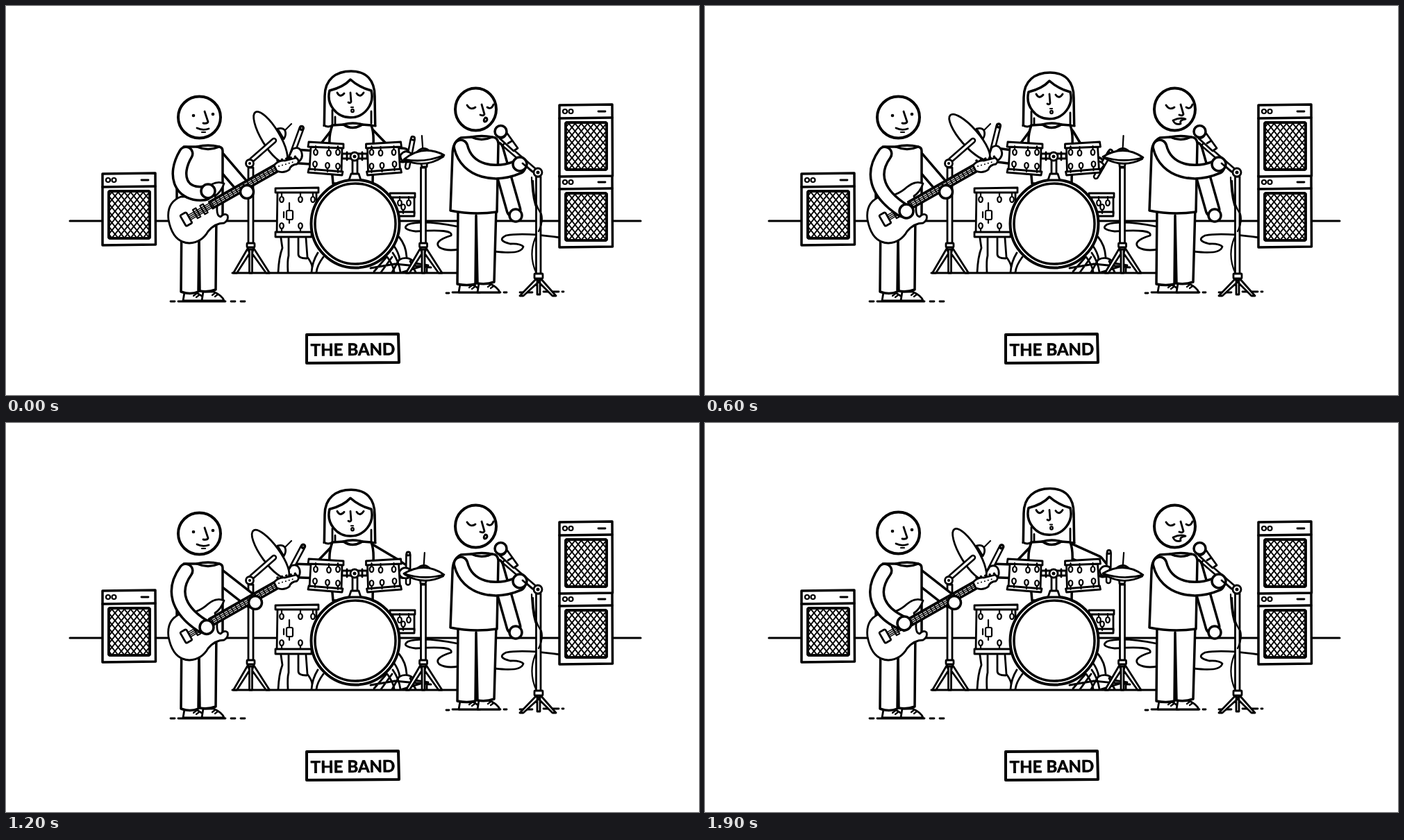
Animation, 998 px wide and 561 px high, one loop 2000 ms. Source, as an HTML page without scripts:

```html
<!DOCTYPE html>
<html lang="en">
<head>
<meta charset="utf-8">
<title>The band</title>
<style>
html, body { margin: 0; width: 100%; height: 100%; overflow: hidden; background: #fff; }
svg { display: block; width: 100vw; height: 100vh; fill: #fff; stroke: #000; stroke-width: 3.5; stroke-linecap: round; stroke-linejoin: round; }
.line { fill: none; }
.mid { stroke-width: 2.8; }
.thin { stroke-width: 2.2; }
.dot { fill: #000; stroke: none; }
/* tubes: a black stroke with a narrower white one on top */
.tube { fill: none; stroke-width: 23; }
.core { fill: none; stroke: #fff; stroke-width: 16; }
.rod { fill: none; stroke-width: 8.5; }
.rod-core { fill: none; stroke: #fff; stroke-width: 3.4; }
text { font: 700 24px Lato, "Open Sans", sans-serif; fill: #000; stroke: #000; stroke-width: .7; text-anchor: middle; }

/* poses advance ten times a second */
.move { animation: 2s steps(3) infinite; }
.hold { animation: 2s step-end infinite; }

.nod { animation-name: nod; }
@keyframes nod {
  15% { translate: 0 -1px; }
  30% { translate: 0 0; animation-timing-function: steps(4); }
  50% { translate: 0 -1px; animation-timing-function: steps(4); }
  70% { translate: 0 -1px; }
  85% { translate: 0 0; animation-timing-function: steps(2); }
  95% { translate: 0 -2px; animation-timing-function: steps(1); }
}
.bob { animation-name: bob; }
@keyframes bob {
  15% { translate: 0 4px; }
  30% { translate: 0 2px; animation-timing-function: steps(4); }
  50% { translate: 0 1.5px; animation-timing-function: steps(4); }
  70% { translate: 0 3px; }
  85% { translate: 0 -.7px; animation-timing-function: steps(2); }
  95% { translate: 0 .5px; animation-timing-function: steps(1); }
}
.strum { d: path("M259 213C240 245 252 274 286 270"); animation-name: strum; }
@keyframes strum {
  15% { d: path("M259 213C236 245 252 275 284 299"); }
  30% { d: path("M259 213C236 245 252 273 284 294"); animation-timing-function: steps(4); }
  50% { d: path("M259 213C236 245 252 273 283 293"); animation-timing-function: steps(4); }
  70% { d: path("M259 213C236 245 252 272 283 292"); }
  85% { d: path("M259 213C238 245 252 277 286 304"); animation-timing-function: steps(2); }
  95% { d: path("M259 213C236 245 250 272 281 287"); animation-timing-function: steps(1); }
}
.pick { translate: 291px 267px; animation-name: pick; }
@keyframes pick {
  15% { translate: 290px 301px; }
  30% { translate: 290px 296px; animation-timing-function: steps(4); }
  50% { translate: 289px 295px; animation-timing-function: steps(4); }
  70% { translate: 289px 294px; }
  85% { translate: 292px 307px; animation-timing-function: steps(2); }
  95% { translate: 287px 289px; animation-timing-function: steps(1); }
}
.fret { animation-name: fret; }
@keyframes fret { 60% { d: path("M306 220L352 256"); } }
.press { translate: 347px 268px; animation-name: press; }
@keyframes press { 60% { translate: 359px 259px; } }

.arm-l { d: path("M474 188L450 219L420 217"); animation-name: arm-l; }
@keyframes arm-l {
  15% { d: path("M474 186L445 212L417 211"); }
  30% { d: path("M474 188L451 219L421 215"); animation-timing-function: steps(4); }
  50% { d: path("M474 187L447 213L417 212"); animation-timing-function: steps(4); }
  70% { d: path("M474 187L449 215L418 214"); }
  85% { d: path("M476 188L466 226L428 225"); animation-timing-function: steps(2); }
  95% { d: path("M474 187L448 214L418 213"); animation-timing-function: steps(1); }
}
.stick-l { translate: 409px 222px; rotate: 20deg; animation-name: stick-l; }
@keyframes stick-l {
  15% { translate: 403px 220px; rotate: 35deg; }
  30% { translate: 411px 220px; rotate: 14deg; animation-timing-function: steps(4); }
  50% { translate: 405px 220px; rotate: 29deg; animation-timing-function: steps(4); }
  70% { translate: 405px 222px; rotate: 27deg; }
  85% { translate: 415px 231px; rotate: 95deg; animation-timing-function: steps(2); }
  95% { translate: 405px 222px; rotate: 27deg; animation-timing-function: steps(1); }
}
.arm-r { d: path("M522 186L548 213L572 215"); animation-name: arm-r; }
@keyframes arm-r {
  15% { d: path("M524 183L566 200L574 214"); }
  30% { d: path("M522 186L540 216L565 228"); animation-timing-function: steps(4); }
  50% { d: path("M524 183L565 201L573 212"); animation-timing-function: steps(4); }
  70% { d: path("M523 185L551 208L570 215"); }
  85% { d: path("M520 187L522 224L540 250"); animation-timing-function: steps(2); }
  95% { d: path("M524 183L564 201L573 212"); animation-timing-function: steps(1); }
}
.stick-r { translate: 578px 232px; rotate: 11deg; animation-name: stick-r; }
@keyframes stick-r {
  15% { translate: 583px 228px; rotate: -7deg; }
  30% { translate: 563px 246px; rotate: 30deg; animation-timing-function: steps(4); }
  50% { translate: 581px 226px; rotate: -3deg; animation-timing-function: steps(4); }
  70% { translate: 577px 235px; rotate: 4deg; }
  85% { translate: 537px 243px; rotate: 127deg; animation-timing-function: steps(2); }
  95% { translate: 581px 228px; rotate: 1deg; animation-timing-function: steps(1); }
}
.crash { rotate: 59deg; animation-name: crash; }
@keyframes crash {
  15% { rotate: 51deg; }
  30% { rotate: 49deg; animation-timing-function: steps(4); }
  50% { rotate: 59deg; animation-timing-function: steps(4); }
  70% { rotate: 49deg; }
  85% { rotate: 49deg; animation-timing-function: steps(2); }
  95% { rotate: 59deg; animation-timing-function: steps(1); }
}
.hat { rotate: -4deg; animation-name: hat; }
@keyframes hat {
  15% { rotate: 0deg; }
  30% { rotate: 3deg; animation-timing-function: steps(4); }
  50% { rotate: 4deg; animation-timing-function: steps(4); }
  70% { rotate: 3deg; }
  85% { rotate: 0deg; animation-timing-function: steps(2); }
  95% { rotate: 4deg; animation-timing-function: steps(1); }
}
.kick { animation-name: kick; }
@keyframes kick { 70% { scale: 1.02; } 75% { scale: 1; } }

.mouth { d: path("M690 161Q693 161 693 164Q692 167 689 167Q687 165 690 161Z"); animation-name: sing; }
@keyframes sing {
  10% { d: path("M676 165Q684 161 692 163Q686 165 686 167Q680 168 676 165Z"); }
  25% { d: path("M674 165Q684 160 692 163Q683 164 685 170Q677 172 674 165Z"); }
  60% { d: path("M690 161Q693 161 693 164Q692 167 689 167Q687 165 690 161Z"); }
  75% { d: path("M680 165Q685 163 690 165Q685 168 680 165Z"); }
  90% { d: path("M674 165Q684 160 692 163Q683 164 685 170Q677 172 674 165Z"); }
}
</style>
</head>
<body>
<svg viewBox="0 0 998 561">
<defs>
  <pattern id="mesh" width="9" height="11" patternUnits="userSpaceOnUse">
    <path class="line" stroke-width="2" d="M-1 -1.2L10 12.2M10 -1.2L-1 12.2"/>
  </pattern>
  <clipPath id="above"><path d="M440 80H550V174H440Z"/></clipPath>
  <g id="amp">
    <path d="M0 1L76 0L76.5 103L0 104Z"/>
    <path class="line" d="M0 20L76 19"/>
    <g class="thin"><circle cx="8" cy="10" r="3"/><circle cx="16.5" cy="10" r="3"/></g>
    <path class="line mid" d="M56 10H66"/>
    <rect x="9" y="26" width="59" height="68" rx="2"/>
    <rect x="9" y="26" width="59" height="68" rx="2" fill="url(#mesh)"/>
  </g>
  <g id="lug" class="thin"><path d="M0 -9V-4"/><ellipse rx="2.8" ry="4"/></g>
  <g id="lug-up" class="thin"><path d="M0 9V4"/><ellipse rx="2.8" ry="4"/></g>
  <g id="tom" class="mid">
    <path d="M439 203L437 237L483 241L484 204Z"/>
    <path d="M436 196L486 199L486 205L435 203Z"/>
    <path d="M436 235L485 239L484 244L435 240Z"/>
    <use href="#lug" x="446" y="211"/><use href="#lug" x="465" y="212"/><use href="#lug" x="478" y="211"/>
    <use href="#lug-up" x="445" y="228"/><use href="#lug-up" x="463" y="230"/><use href="#lug-up" x="478" y="231"/>
  </g>
  <g id="stand">
    <path class="mid" d="M-3.5 -110H3.5V0H-3.5Z"/>
    <g class="mid">
      <path d="M-4 6L-25 42L-20 42L-2 14ZM4 6L27 42L22 42L2 14ZM-2 8V42H2V8Z"/>
      <rect x="-5.5" y="-1" width="11" height="6" rx="1"/>
    </g>
  </g>
  <g id="shoes" class="mid">
    <path d="M5 0L3 12H34Q34 6 21 0Z"/>
    <path d="M32 -1L30 12H62Q60 5 47 -1Z"/>
    <path class="thin" d="M18 5L22 2M22 7L26 4M45 4L49 1M49 6L53 3"/>
  </g>
</defs>

<!-- floor and amps -->
<path class="line" stroke-width="3" d="M92 310H914M326 385H650"/>
<path class="line mid" d="M650 318Q600 308 579 315Q568 322 590 325Q645 321 641 331Q615 339 624 348Q634 354 652 351M704 354Q742 359 745 347Q740 342 726 343Q706 338 720 331Q745 326 798 334"/>
<use href="#amp" x="139" y="241"/>
<use href="#amp" x="797" y="244"/>
<use href="#amp" x="797" y="142"/>

<!-- drummer and kit -->
<g class="line mid">
  <path d="M566 333Q576 345 577 362M558 345Q566 356 567 366M566 366Q580 359 589 371L608 374M525 378L560 372L612 377M530 383L548 362M540 384L556 362M556 384L566 366M570 384L604 374M590 384L582 368M606 384V376"/>
</g>
<g clip-path="url(#above)">
  <g class="bob move">
    <path d="M458 190L459 130C459 106 475 94 497 94C519 94 531 107 531 130L532 190Z"/>
    <path class="line mid" d="M470 150V171M474 160V173M526 152V169"/>
    <path d="M466 122Q486 117 496 106Q508 117 526 122A31 31 0 1 1 466 122Z"/>
    <path class="line mid" d="M477 125Q481 133 487 126M505 126Q510 133 515 125M496 125L497 138Q496 141 493 139"/>
    <path class="line thin" d="M497 146H500"/>
    <ellipse class="thin" cx="499" cy="151" rx="1.8" ry="2.2"/>
  </g>
</g>
<path class="line mid" d="M458 172Q464 176 470 172M526 172L532 173"/>
<g class="mid">
  <path d="M557 272H588V300H557Z"/>
  <path d="M553 270H589V276H553ZM553 297H588V303H553Z"/>
  <use href="#lug" x="567" y="284"/><use href="#lug" x="580" y="284"/><use href="#lug-up" x="572" y="290"/>
</g>
<path class="tube arm-l move"/><path class="core arm-l move"/>
<path class="tube arm-r move"/><path class="core arm-r move"/>
<path d="M470 172Q465 185 466 200L471 256H528L529 200Q530 182 526 172L513 171Q499 180 486 171Z"/>
<path class="line" d="M486 171Q499 167 513 171"/>
<g class="stick-l move">
  <path class="rod" stroke-width="7" d="M0 0V-47"/><path class="rod-core" stroke-width="2" d="M0 0V-47"/>
  <circle cy="-49" r="2.5"/>
  <path class="mid" d="M-2 -16Q5 -24 12 -16Q18 -8 11 0Q3 3 -3 -4Z"/>
</g>
<g class="stick-r move">
  <path class="rod" d="M0 0V-40"/><path class="rod-core" d="M0 0V-40"/>
  <circle class="mid" cy="-42" r="2.5"/>
  <path class="mid" d="M2 -20Q-8 -25 -13 -15Q-12 -5 0 -7Z"/>
</g>

<g class="line mid">
  <path d="M396 335L398 349Q393 362 392 384M407 335V360Q405 367 406 384M421 335V358Q421 364 433 364M432 335L434 362Q440 370 441 376"/>
  <path d="M449 356Q441 369 440 384M457 362Q448 374 447 384M557 356Q566 369 568 384M549 362Q558 374 559 384"/>
</g>
<g class="mid">
  <path d="M391 268L390 328H447V268Z"/>
  <path d="M388 263L450 262V269H388ZM388 326H440V333L388 333Z"/>
  <use href="#lug" x="397" y="279"/><use href="#lug" x="424" y="279"/><use href="#lug" x="442" y="279"/>
  <use href="#lug-up" x="397" y="317"/><use href="#lug-up" x="424" y="317"/>
  <path class="line thin" d="M408 284V313M400 297V305"/>
  <rect class="thin" x="404" y="295" width="9" height="13" rx="2"/>
</g>

<g transform="translate(503 314)">
  <g class="kick hold">
    <circle r="63.5" stroke-width="4"/>
    <circle r="58"/>
  </g>
</g>
<g class="mid">
  <path d="M499 222H506V243H499Z"/>
  <path d="M494 251L497 242H508L511 251Z"/>
  <path d="M484 213H520V220H484Z"/>
  <path d="M491 211V222M513 211V222"/>
  <circle cx="502" cy="217" r="6"/><circle class="dot" cx="502" cy="217" r="2.5"/>
</g>
<use href="#tom"/>
<use href="#tom" transform="translate(1004.5 0) scale(-1 1)"/>

<use href="#stand" x="601" y="343"/>
<g transform="translate(602 217)">
  <g class="hat move mid">
    <path class="thin" d="M-1 -30V-12"/>
    <path d="M-5 9H4L3 15H-4Z"/>
    <path d="M-28 3Q0 18 28 2Z"/>
    <path d="M-10 -7Q0 -16 9 -7Z"/>
    <path d="M-29 2Q0 -18 29 0Q0 10 -29 2Z"/>
  </g>
</g>

<use href="#stand" x="352.5" y="343"/>
<path class="line thin" d="M400 181L411 170"/>
<path class="mid" d="M391 177Q399 175 402 180Q404 186 400 192Z"/>
<g transform="translate(381 189)">
  <ellipse class="crash move mid" rx="42" ry="13"/>
</g>
<path class="rod" d="M354 222L386 194"/><path class="rod-core" d="M354 222L386 194"/>
<circle class="mid" cx="351" cy="227" r="5.5"/><circle class="dot" cx="351" cy="227" r="2"/>

<!-- guitarist -->
<path class="line mid" d="M237 426H243M248 426H316M324 426H330M338 426H344"/>
<use href="#shoes" x="252" y="413"/>
<path d="M253 300L252 412Q265 417 277 412L278 330L279 411Q291 413 302 409L303 300Z"/>
<path class="tube fret hold" d="M306 220L342 262"/><path class="core fret hold" d="M306 220L342 262"/>
<path d="M256 203L275 203Q291 210 307 203Q312 204 312 209V308H246V220Z"/>
<path class="line" d="M275 203Q291 199 307 203"/>
<g class="nod move">
  <ellipse cx="278.5" cy="160.5" rx="30.5" ry="30" stroke-width="4"/>
  <circle class="dot" cx="270" cy="158" r="2.3"/><circle class="dot" cx="298" cy="156" r="2.3"/>
  <path class="line mid" d="M286 152L291 167Q290 170 284 169M275 176Q283 180 292 177"/>
  <path class="line thin" d="M282 182H287"/>
</g>
<path class="mid" d="M301 274Q310 268 314 256Q303 251 291 261Q275 276 252 275Q231 283 234 308Q240 341 264 342Q282 341 291 325Q301 313 314 313Q321 309 319 302Q315 298 309 304Q303 303 304 290Z"/>
<g transform="translate(262 306) rotate(-29.6)">
  <rect class="mid" x="38" y="-5.5" width="112" height="11"/>
  <path class="thin" d="M12 -7H17V7H12ZM24 -7H29V7H24Z"/>
  <path class="line" stroke-width="1.4" d="M0 -3.5H148M0 -1H148M0 1.5H148M0 4H148"/>
  <path class="line" stroke-width="10" stroke-linecap="butt" stroke-dasharray="1.6 5" d="M40 0H148"/>
  <rect class="mid" x="-8" y="-9" width="10" height="18" rx="2"/>
</g>
<path class="mid" d="M386 230Q392 222 402 223L418 219Q424 223 419 228Q410 229 408 236Q400 242 390 238Z"/>
<path class="line" stroke-width="3.6" stroke-dasharray=".1 6.4" d="M391 223L418 217"/>
<path class="line" stroke-width="2" stroke-dasharray=".1 5" d="M393 231L414 225"/>
<path class="tube strum move"/><path class="core strum move"/>
<circle class="pick move" r="10"/>
<circle class="press hold" r="9.5"/>

<!-- singer -->
<path class="line mid" d="M634 414H638M643 413H712M717 413H721M740 413H758M774 412H796M801 412H803"/>
<use href="#shoes" x="649" y="401"/>
<path d="M651 290L650 401Q664 404 676 401L677 302L679 400Q692 402 703 398L706 290Z"/>
<path class="tube" stroke-width="21" d="M706 206L731 294"/><path class="core" d="M706 206L731 294"/>
<circle cx="734" cy="302" r="9"/>
<path d="M655 190L670 189Q685 196 700 189Q708 189 709 198L707 297Q673 302 640 295L643 214Q643 196 655 190Z"/>
<path class="line" d="M670 189Q685 186 700 189"/>
<ellipse cx="676.5" cy="149" rx="29.5" ry="30.5" stroke-width="4"/>
<path class="line mid" d="M664 143Q669 151 676 146M693 146Q699 150 702 142M685 142L689 156Q688 159 683 157"/>
<path class="mouth hold mid"/>

<path class="line thin" d="M757 247Q758 285 768 300Q775 316 762 335Q752 360 764 386"/>
<g class="mid">
  <path d="M764 393L740 418L745 418L767 398ZM770 393L792 418L787 418L767 398ZM765 393V416H769V393Z"/>
  <path d="M763.5 246H770V388H763.5Z"/>
  <rect x="761" y="386" width="12" height="7" rx="1"/>
</g>
<path class="line thin" d="M759 252Q760 286 771 300Q774 311 767 325"/>
<path class="rod" d="M719 201L762 238"/><path class="rod-core" d="M719 201L762 238"/>
<path class="mid" d="M711 191L722 184L737 205L731 209Z"/>
<circle cx="712.5" cy="181" r="8.5"/>
<path class="line mid" d="M712 191Q719 190 721 183M723 198L728 195"/>
<circle class="mid" cx="766" cy="240" r="6"/><circle class="dot" cx="766" cy="240" r="2.5"/>
<path class="tube" d="M655 203C664 240 705 246 738 232"/><path class="core" d="M655 203C664 240 705 246 738 232"/>
<circle cx="740" cy="228" r="10"/>
<path class="line mid" d="M744 227L758 239"/>

<!-- sign -->
<path d="M433 474L565 473L566 514L433 515Z" stroke-width="4"/>
<text x="499.5" y="504" transform="rotate(-.6 499 495)">THE BAND</text>
</svg>
</body>
</html>
```
